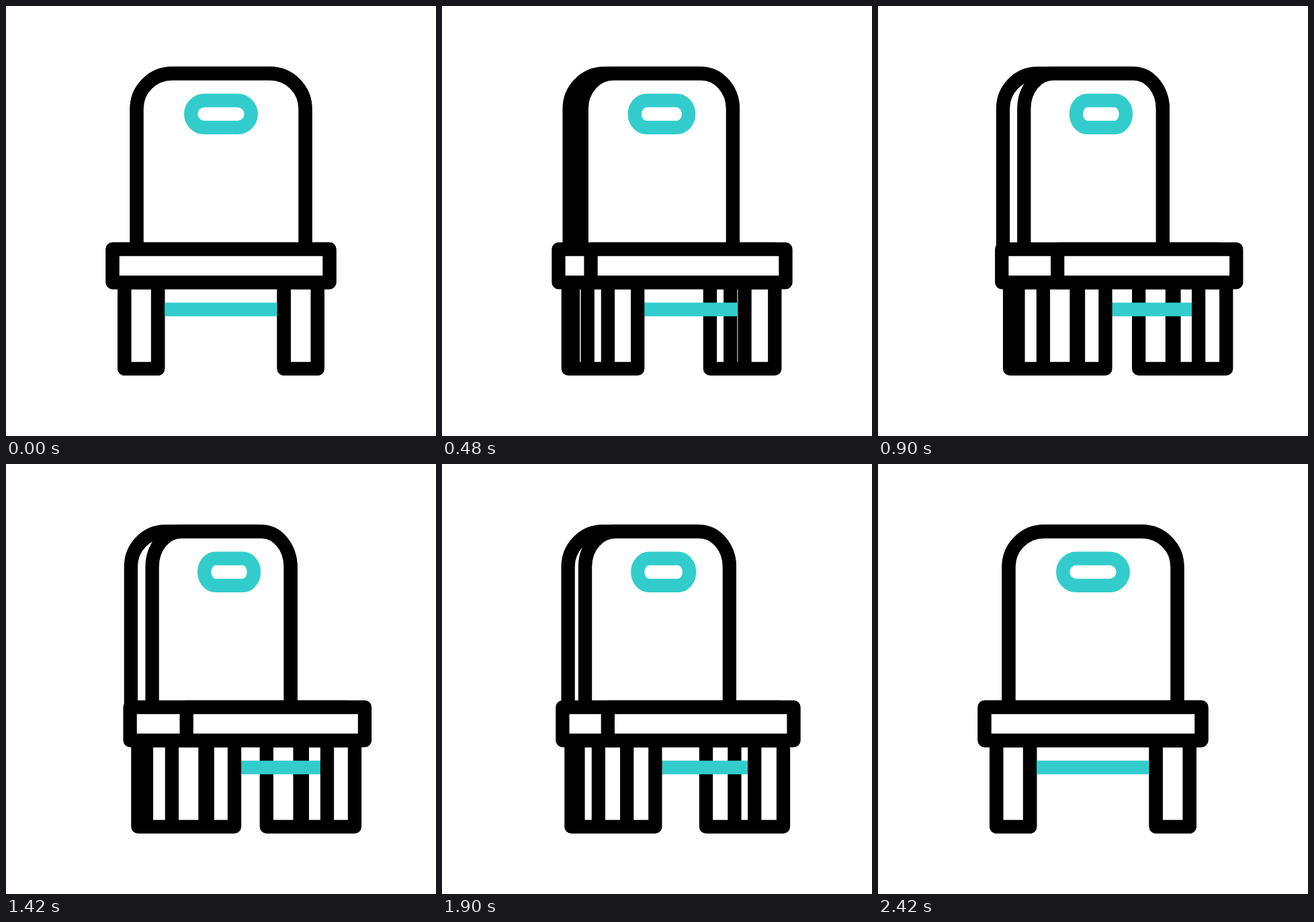
An HTML page with a canvas that plays this animation: 640 px wide and 640 px high, repeating every 3.6 s.

```html
<!DOCTYPE html>
<html lang="en">
<head>
<meta charset="utf-8">
<title>Turning chair</title>
<style>
  html, body { margin: 0; width: 100%; height: 100%; overflow: hidden; background: #fff; }
  canvas { display: block; }
</style>
</head>
<body>
<canvas id="stage" width="640" height="640"></canvas>
<script>
const ctx = document.getElementById('stage').getContext('2d');
const LOOP = 3600;
const BLACK = '#000', TEAL = '#33cccc';

const mix = (a, b, p) => a + (b - a) * p;

// Cubic ease with horizontal tangents; x1 and x2 set how long each end lingers.
function ease(x, x1, x2) {
  if (x <= 0) return 0;
  if (x >= 1) return 1;
  let lo = 0, hi = 1;
  for (let i = 0; i < 24; i++) {
    const s = (lo + hi) / 2, r = 1 - s;
    if (3 * r * r * s * x1 + 3 * r * s * s * x2 + s ** 3 < x) lo = s; else hi = s;
  }
  return lo * lo * (3 - 2 * lo);
}

// 0 = chair seen from the front, 1 = fully turned
const turnAt = t =>
  ease((t - 10) / 1050, 0.622, 0.182) - ease((t - 1400) / 1020, 0.795, 0.679);

function paint(color) {
  ctx.strokeStyle = color;
  ctx.fill();
  ctx.stroke();
}

function box(left, right, top, bottom) {
  ctx.beginPath();
  ctx.rect(left, top, right - left, bottom - top);
  paint(BLACK);
}

const leg = (left, right) => box(left, right, 411.5, 539.8);
const seat = (left, right) => box(left, right, 362, 411.4);

function backrest(left, right, rx) {
  const top = 100.5, ry = 52.5;
  ctx.beginPath();
  ctx.moveTo(left, 362);
  ctx.lineTo(left, top + ry);
  ctx.ellipse(left + rx, top + ry, rx, ry, 0, Math.PI, Math.PI * 1.5);
  ctx.ellipse(right - rx, top + ry, rx, ry, 0, Math.PI * 1.5, Math.PI * 2);
  ctx.lineTo(right, 362);
  paint(BLACK);
}

function handle(left, right, rx) {
  const y = 160.8, ry = 20.1;
  ctx.beginPath();
  ctx.ellipse(left + rx, y, rx, ry, 0, Math.PI / 2, Math.PI * 1.5);
  ctx.ellipse(right - rx, y, rx, ry, 0, -Math.PI / 2, Math.PI / 2);
  ctx.closePath();
  paint(TEAL);
}

function draw(t) {
  const p = turnAt(t);
  const at = (from, to) => mix(from, to, p);

  ctx.fillStyle = '#fff';
  ctx.fillRect(0, 0, 640, 640);
  ctx.lineWidth = 20.3;
  ctx.lineJoin = 'round';

  backrest(at(194.6, 185.9), at(445.4, 423.5), at(52.5, 51));
  backrest(at(194.6, 217.6), at(445.4, 423.5), at(52.5, 43.2));
  handle(at(275.2, 295.2), at(364.8, 369), at(20.1, 16.6));

  // Rear legs and side faces keep their width and only slide.
  for (const shift of [20, 32.5, 70.5]) leg(176.4 + shift * p, 226 + shift * p);
  for (const shift of [-26, 27]) leg(413.8 + shift * p, 463.6 + shift * p);

  const innerLeft = at(226, 340), innerRight = at(413.8, 478);
  ctx.fillStyle = TEAL;
  ctx.fillRect(innerLeft, 441.5, innerRight - innerLeft, 20.3);
  ctx.fillStyle = '#fff';

  leg(at(176.4, 299.7), innerLeft);
  leg(innerRight, at(463.6, 519));

  seat(158.6 + 26 * p, 481.4 + 26 * p);
  seat(at(158.6, 268.7), at(481.4, 534));
}

let start;
function frame(now) {
  start ??= now;
  draw((now - start) % LOOP);
  requestAnimationFrame(frame);
}
draw(0);
requestAnimationFrame(frame);
</script>
</body>
</html>
```
